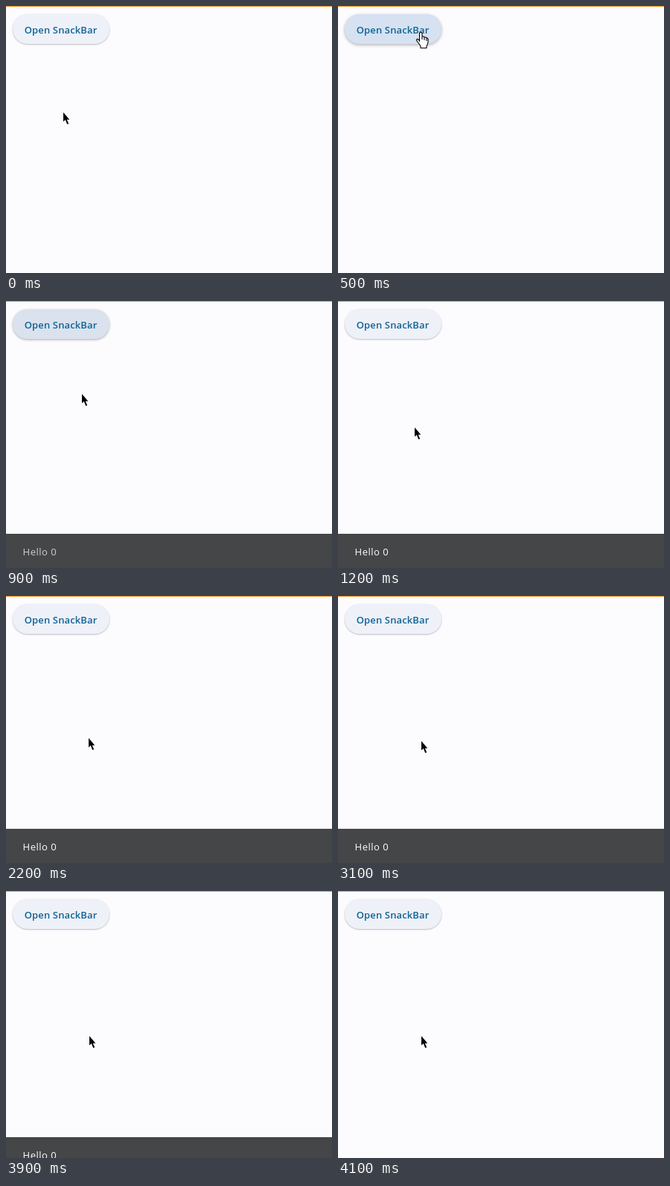
Recreate the animation shown at these times as an HTML page with a canvas. Size 438 px wide and 359 px high, loop 4500 ms.

```html
<!DOCTYPE html>
<html lang="en">
<head>
<meta charset="utf-8">
<title>SnackBar demo</title>
<style>
  html, body { margin: 0; width: 100%; height: 100%; overflow: hidden; background: #fcfcff; }
  canvas { display: block; }
</style>
</head>
<body>
<canvas id="stage" width="438" height="359"></canvas>
<script>
const ctx = document.getElementById('stage').getContext('2d');
const W = 438, H = 359, LOOP = 4500, STEP = 100;
const BAR_H = 46, BAR_MS = 250, BAR_IN = 682, BAR_OUT = 3750;

const clamp = v => Math.min(1, Math.max(0, v));
const lerp = (a, b, k) => a + (b - a) * k;
const span = (t, from, to) => clamp((t - from) / (to - from));
const smooth = k => k * k * (3 - 2 * k);
const easeOut = k => 1 - (1 - k) ** 2;
const mix = (a, b, k) => a.map((v, i) => lerp(v, b[i], k));
const rgb = c => `rgb(${c.map(Math.round)})`;

// cubic-bezier(0.4, 0, 0.2, 1), solved for x by bisection
function fastOutSlowIn(x) {
  let lo = 0, hi = 1;
  for (let i = 0; i < 20; i++) {
    const s = (lo + hi) / 2, r = 1 - s;
    if (3 * r * r * s * 0.4 + 3 * r * s * s * 0.2 + s ** 3 < x) lo = s; else hi = s;
  }
  return smooth(lo);
}

const REST = [239, 241, 248], HOVER = [214, 225, 241], PRESSED = [208, 218, 232];

const ARROW = [[0, 0], [0, 12.5], [2.8, 10], [5.2, 16], [7.2, 15.2], [4.8, 9.8], [8.3, 9.8]];
const HAND = [[4.5, 1.5], [5.5, 0.5], [7, 0.5], [8, 1.5], [8, 6], [10, 6], [11, 7], [13, 7],
  [14, 8], [15, 8], [16, 9.5], [16, 14], [15, 17], [14, 19], [14, 21.5], [6, 21.5],
  [6, 19], [4, 16], [1, 12], [0.5, 10.5], [1.5, 9.5], [3, 10], [4.5, 12]];

function trace(points) {
  ctx.beginPath();
  points.forEach(([x, y]) => ctx.lineTo(x, y));
  ctx.closePath();
}

function text(str, x, y, weight, color, spacing) {
  ctx.font = `${weight} 13px "Open Sans", "Noto Sans", sans-serif`;
  ctx.letterSpacing = spacing;
  ctx.fillStyle = color;
  ctx.fillText(str, x, y);
}

function button(t) {
  const lift = t < 800 ? span(t, 200, 500) : 1 - span(t, 800, 1100);
  const fill = t < 800 ? mix(REST, HOVER, lift) : mix(REST, PRESSED, lift);
  ctx.save();
  ctx.shadowColor = 'rgba(0, 0, 0, 0.3)';
  ctx.shadowBlur = lerp(2, 4, lift);
  ctx.shadowOffsetY = lerp(0.8, 1.5, lift);
  ctx.fillStyle = rgb(fill);
  ctx.beginPath();
  ctx.roundRect(9, 11, 130, 40, 20);
  ctx.fill();
  ctx.restore();
  text('Open SnackBar', 24.7, 37, 600, '#0f6496', '0.14px');
}

function snackBar(t) {
  const enter = span(t, BAR_IN, BAR_IN + BAR_MS);
  const leave = span(t, BAR_OUT, BAR_OUT + BAR_MS);
  const shown = t < 800 ? 0 : fastOutSlowIn(Math.min(enter, 1 - leave));
  if (shown <= 0) return;
  const top = H - Math.round(BAR_H * shown);
  ctx.fillStyle = '#454648';
  ctx.fillRect(0, top, W, BAR_H);
  ctx.globalAlpha = span(enter, 0.5, 1);
  text('Hello 0', 22.6, top + 29, 400, '#fff', '0.5px');
  ctx.globalAlpha = 1;
}

function pointerAt(t) {
  if (t < 800) {
    const k = smooth(span(t, 0, 400));
    return [lerp(77, 110, k), lerp(143, 35, k)];
  }
  if (t < 1900) {
    const k = easeOut(span(t, 800, 1200));
    return [lerp(102, 103, k), lerp(90, 170, k)];
  }
  const k = smooth(span(t, 1900, 2300));
  return [lerp(103, 112, k), lerp(170, 195, k)];
}

function pointer(t) {
  const [x, y] = pointerAt(t).map(Math.round);
  const overButton = y < 51;
  ctx.save();
  ctx.translate(overButton ? x - 5 : x, y);
  trace(overButton ? HAND : ARROW);
  if (overButton) {
    ctx.fillStyle = '#fff';
    ctx.fill();
    for (const [lx, ly] of [[8, 6], [11, 7], [14, 8]]) {
      ctx.moveTo(lx, ly);
      ctx.lineTo(lx, ly + 4);
    }
    ctx.strokeStyle = '#000';
    ctx.lineWidth = 1.1;
    ctx.stroke();
  } else {
    ctx.fillStyle = '#000';
    ctx.fill();
  }
  ctx.restore();
}

function draw(t) {
  ctx.fillStyle = '#fcfcff';
  ctx.fillRect(0, 0, W, H);
  ctx.fillStyle = '#f39422';
  ctx.fillRect(0, 0, W, 1);
  button(t);
  snackBar(t);
  pointer(t);
}

const start = performance.now();
function tick() {
  const t = (performance.now() - start) % LOOP;
  draw(Math.floor(t / STEP) * STEP);
  requestAnimationFrame(tick);
}
tick();
</script>
</body>
</html>
```
